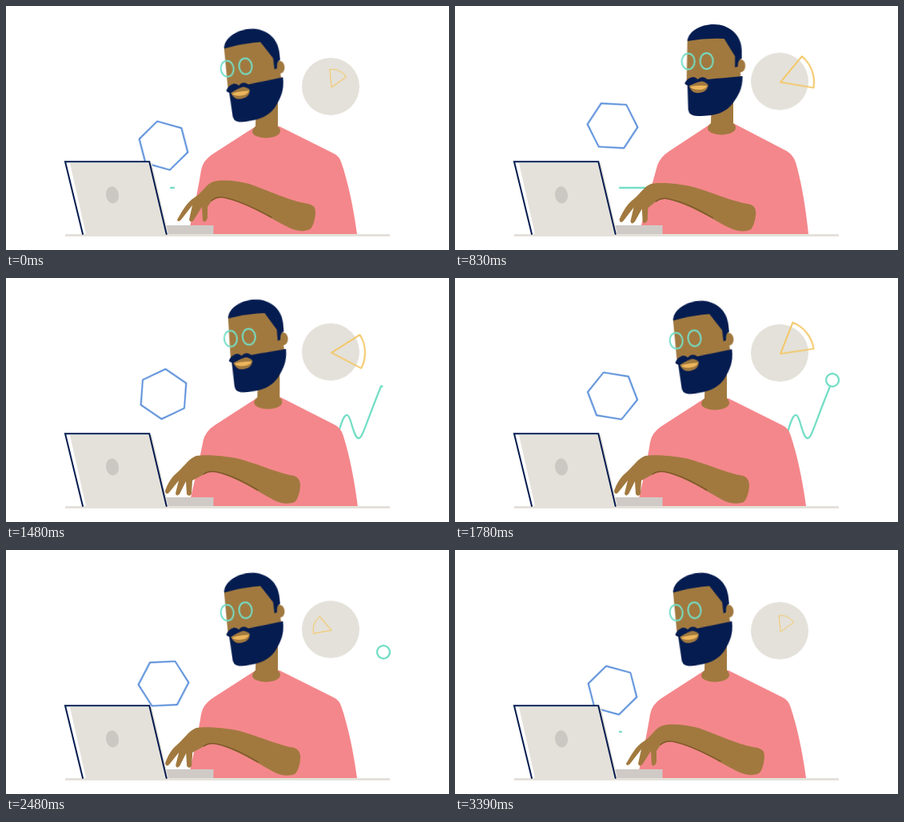
An HTML page for the animation above (3430 ms loop, 554x306 px).

```html
<!DOCTYPE html>
<html lang="en">
<head>
<meta charset="utf-8">
<title>Working at a laptop</title>
<style>
@property --head { syntax: "<length>"; inherits: false; initial-value: 0px; }
@property --tail { syntax: "<length>"; inherits: false; initial-value: 0px; }

:root {
  --loop: 3430ms;
  --sine: cubic-bezier(.37, 0, .63, 1);
  --cubic: cubic-bezier(.65, 0, .35, 1);
}
html, body { margin: 0; width: 100%; height: 100%; overflow: hidden; background: #fff; }
svg { display: block; width: 100vw; height: 100vh; }
svg * { animation-duration: var(--loop); animation-iteration-count: infinite; }

.navy { fill: #051c50; }
.skin { fill: #a1793f; }
.grey { fill: #e4e1da; }
.line { fill: none; stroke-width: 2; stroke-linejoin: round; stroke-linecap: round; }
.teal { stroke: #74dec6; }

/* floating chart */
.pie { animation-name: pie; animation-delay: -2080ms; animation-timing-function: var(--sine); }
@keyframes pie {
  0%, 100% { transform: translate(406px, 92.6px); }
  50% { transform: translate(406px, 102px); }
}
.turn { animation-name: turn; }
@keyframes turn {
  0%, 6.7% { transform: rotate(-5.5deg); animation-timing-function: cubic-bezier(.6, 0, .4, 1); }
  37.9% { transform: rotate(64deg); animation-timing-function: cubic-bezier(.37, 0, .63, 1); }
  81.6%, 83.5% { transform: rotate(-120deg); animation-timing-function: step-end; }
  84%, 100% { transform: rotate(-5.5deg); }
}
.grow { animation-name: grow; animation-delay: -550ms; animation-timing-function: var(--sine); }
@keyframes grow {
  0%, 99.1%, 100% { transform: scale(0); }
  30.6%, 78.7% { transform: scale(1); }
}

/* floating hexagon */
.bob { animation-name: bob; animation-delay: -2080ms; }
@keyframes bob {
  0%, 100% { transform: translate(197px, 145.3px); animation-timing-function: cubic-bezier(.58, 0, .63, 1); }
  50% { transform: translate(197px, 179.2px); animation-timing-function: cubic-bezier(.37, 0, .5, 1); }
}
.spin { animation-name: spin; animation-timing-function: cubic-bezier(.36, 0, .35, 1); }
@keyframes spin {
  from { transform: rotate(-14.5deg); }
  to { transform: rotate(225.5deg); }
}

/* trend line: the front end runs ahead, the tail follows */
.trend {
  stroke-width: 2.3;
  stroke-dasharray: calc(var(--head) - var(--tail)) 999px;
  stroke-dashoffset: calc(-1 * var(--tail));
  animation-name: head, tail;
  animation-delay: -130ms;
}
@keyframes head {
  0% { --head: 0px; animation-timing-function: cubic-bezier(.37, 0, .63, 1); }
  62.7%, 100% { --head: 434px; }
}
@keyframes tail {
  0%, 34.1% { --tail: 0px; opacity: 1; animation-timing-function: cubic-bezier(.37, 0, .63, 1); }
  89.5% { --tail: 434px; opacity: 1; animation-timing-function: step-end; }
  89.7%, 100% { --tail: 434px; opacity: 0; }
}

/* person */
.face, .neck, .shirt { animation-timing-function: var(--cubic); }
.face { transform-origin: 320px 80px; animation-name: face; }
@keyframes face {
  0%, 51.9%, 100% { transform: translate(-13.3px, 5.8px) rotate(-6.5deg); }
  21%, 30.9% { transform: translate(.6px, 0px) rotate(0deg); }
}
.neck { animation-name: neck; }
@keyframes neck {
  0%, 51.9%, 100% { transform: translate(-8px, 4px); }
  21%, 30.9% { transform: translate(0px, 0px); }
}
.shirt { fill: #f4878b; animation-name: shirt; }
@keyframes shirt {
  0%, 51.9%, 100% { d: path("M313 150.5 L258 186 Q246 194 244 206 Q240 232 228 286 H439 Q432 235 420 198 Q417 188 410 185 L342 151 Z"); }
  21%, 30.9% { d: path("M321 147 L268 182 Q257 189 253 200 Q246 225 230 286 H442 Q436 230 426 196 Q423 187 415 182 L348 147 Z"); }
}
.arm, .crease { animation-timing-function: var(--cubic); }
.arm { animation-name: arm; }
@keyframes arm {
  0%, 100% { d: path("M214 268 C220 258 226 246 236 240 C246 234 250 223 260 220 C272 217 292 220 304 223 C325 230 355 245 378 248 Q387 250 387 258 C387 266 384 278 380 280 C372 284 362 282 352 277 C330 266 300 246 272 240 Q262 240 256 246 L252 252 L252 266 Q249 273 246 269 L245 252 L235 268 Q231 273 229 268 L233 250 L219 268 Q215 272 214 268 Z"); }
  13.1% { d: path("M214 268 C220 258 226 246 234 241 C244 235 246 226 255 223 C268 220 292 223 306 227 C327 233 356 246 378 249 Q387 250 387 258 C387 266 384 278 380 280 C372 284 362 282 352 277 C330 266 300 247 270 241 Q260 240 254 246 L252 252 L252 266 Q249 275 246 270 L245 254 L235 270 Q231 275 229 270 L233 251 L219 270 Q215 275 214 268 Z"); }
  34.4%, 69.1% { d: path("M199 267 C203 256 207 250 214 244 C223 236 229 226 238 223 C250 221 272 223 288 226 C310 231 340 245 360 248 Q367 250 368 259 C368 267 365 278 361 281 C354 284 342 283 334 278 C316 268 290 251 262 243 Q254 243 246 247 L233 254 L232 271 Q229 275 226 271 L225 255 L217 271 Q213 275 212 270 L216 254 L204 269 Q200 273 199 267 Z"); }
}
.crease { stroke: #80592a; stroke-width: 1.5; animation-name: crease; }
@keyframes crease {
  0%, 13.1%, 100% { d: path("M257 244 Q263 239 272 240 C292 244 312 254 332 265"); }
  34.4%, 69.1% { d: path("M247 246 Q254 241 262 243 C282 247 298 256 315 266"); }
}
</style>
</head>
<body>
<svg viewBox="0 0 554 306" preserveAspectRatio="none">
  <g class="pie">
    <circle class="grey" r="36"/>
    <g transform="translate(1 1)">
      <g class="turn">
        <path class="line grow" stroke="#f3c766" d="M0 0 V-42 A42 42 0 0 1 36.4 -21 Z"/>
      </g>
    </g>
  </g>

  <path class="line teal trend" pathLength="434"
    d="M206 228 H412 C420 228 413 205 417 190 C421 176 424 171 427 172 C432 174 434 200 441 201 C446 201 450 182 469.2 135.5 A8 8 0 0 0 474.8 120.5 A8 8 0 0 0 469.2 135.5 A8 8 0 0 0 480 128"/>

  <g class="bob">
    <path class="line spin" stroke="#5088d8" d="M0 -31.5 L27.3 -15.7 V15.7 L0 31.5 L-27.3 15.7 V-15.7 Z"/>
  </g>

  <path class="shirt" d="M313 150.5 L258 186 Q246 194 244 206 Q240 232 228 286 H439 Q432 235 420 198 Q417 188 410 185 L342 151 Z"/>
  <path class="skin neck" d="M321 108 L320 147 Q316 150 316 154 C318 164 350 164 351 153 Q351 149 348 147 V103 Z"/>

  <g class="face">
    <path class="skin" d="M290 42 L289 94 L292 110 L330 120 L357 92 L353 38 Z"/>
    <ellipse class="skin" cx="356.5" cy="75" rx="6" ry="8"/>
    <path class="navy" d="M290 44 C291 32 306 23 323 23 C342 23 358 36 358 56 V66 Q353 67 353 76 L349.5 77 V63 L336 41 Q313 40 290 44 Z"/>
    <path class="navy" d="M290 97 C302 92 330 91 359 88 C359 104 354 112 346 123 C337 134 325 138 303 138 Q292 138 291 130 Z"/>
    <path class="skin" d="M292 100 Q300 96 305 94 Q312 94 316 99 C315 107 309 109 302 109 Q295 109 292 100 Z"/>
    <path fill="#edb65d" d="M293 101 Q304 99 315 100 Q313 105 304 105 Q296 105 293 101 Z"/>
    <path class="navy" d="M286.5 97 Q290 90 297 89 Q300 89 303 92 Q307 88 312 90 L318 94 L317 98 L309 94 Q300 96 294 99 Q289 101 286.5 97 Z"/>
    <g class="line teal">
      <ellipse cx="291" cy="69.5" rx="8" ry="10"/>
      <ellipse cx="314" cy="69" rx="8" ry="10"/>
    </g>
  </g>

  <path fill="#d0cac7" d="M198 275 H259.5 V287 H198 Z"/>
  <path class="skin arm" d=""/>
  <path class="line crease" d=""/>

  <path class="grey" d="M74 286 H480 V289 H74 Z"/>
  <path fill="#fff" d="M74 195 H179 L201 286 H96 Z"/>
  <path class="grey" d="M80 197 H182.500 L203 286 H100 Z"/>
  <path class="line" stroke="#051c50" style="stroke-linejoin: miter" d="M96 286 L74 195.300 H179.300 L200.700 286"/>
  <ellipse cx="133" cy="237" rx="8" ry="10.7" fill="#cbc8c4" transform="rotate(-8 133 237)"/>
</svg>
</body>
</html>
```
